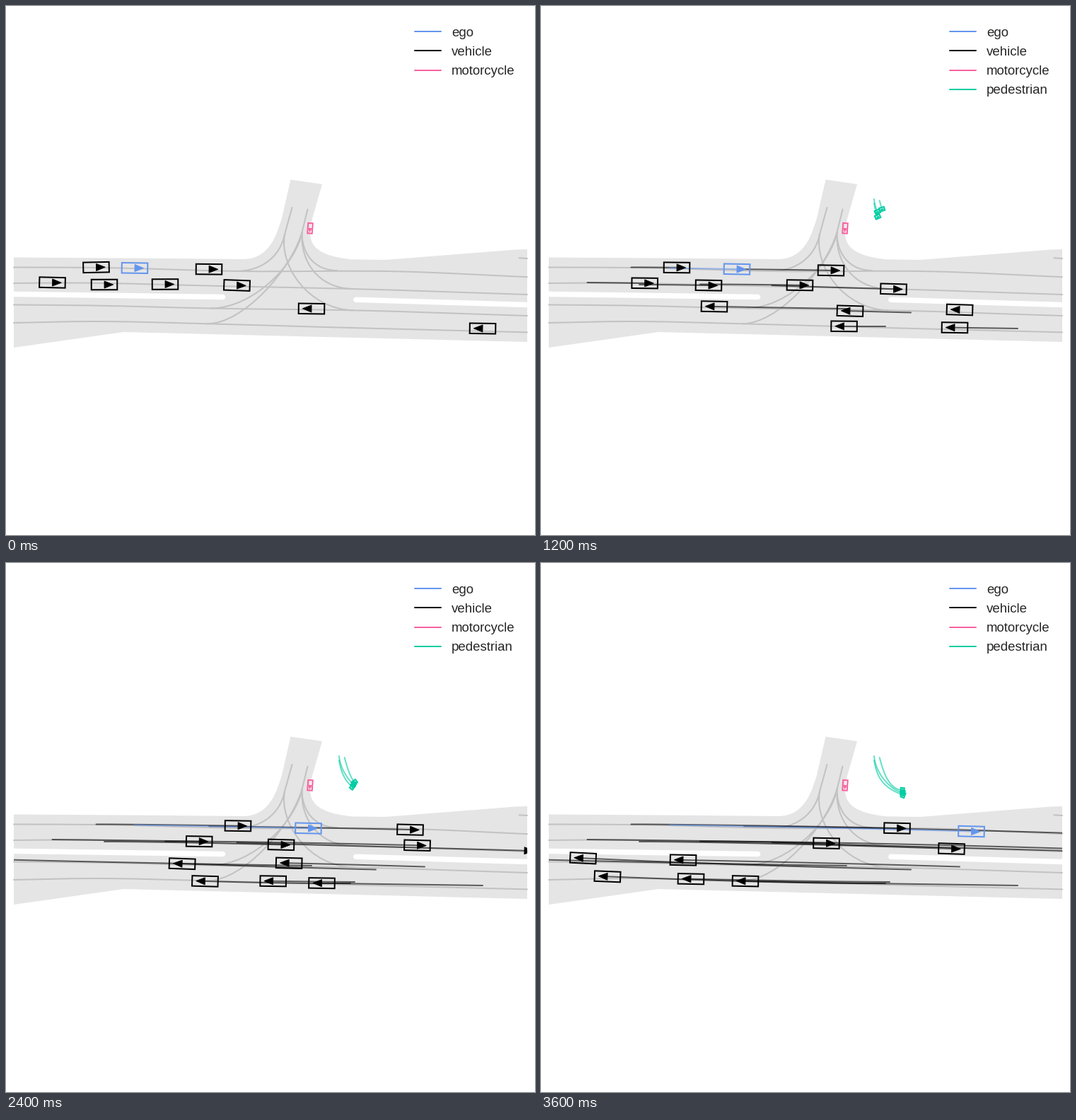
A matplotlib script for the animation above (3800 ms loop, 748 by 748 pixels).

```python
import numpy as np
import matplotlib.pyplot as plt
from matplotlib.animation import FuncAnimation
from matplotlib.patches import PathPatch, Polygon, Rectangle
from matplotlib.path import Path

SIZE, DPI = 748, 64
FRAMES, STEP = 19, 200
LAST = FRAMES - 1
LEFT, RIGHT = 11, 737
PT = 72 / DPI  # points per pixel

ROAD, LANE = "#e5e5e5", "#c2c2c2"
STYLE = {  # colour, body length, body width
    "ego": ("#6495ed", 36.5, 14.5),
    "vehicle": ("#000000", 36.5, 14.5),
    "motorcycle": ("#f9629f", 14.5, 6.5),
    "pedestrian": ("#00cca3", 5, 7),
}

fig = plt.figure(figsize=(SIZE / DPI, SIZE / DPI), dpi=DPI, facecolor="white")
ax = fig.add_axes([0, 0, 1, 1])
ax.set(xlim=(0, SIZE), ylim=(SIZE, 0))
ax.axis("off")
window = Rectangle((LEFT, 0), RIGHT - LEFT, SIZE, transform=ax.transData)


def through(values):
    """Polynomial on 0..1 that passes evenly spaced values."""
    n = len(values)
    return np.poly1d(np.polyfit(np.linspace(0, 1, n), values, n - 1))


def place(points, center, angle):
    c, s = np.cos(angle), np.sin(angle)
    return np.array(points) @ np.array([[c, s], [-s, c]]) + center


def stroke(x, y, color, width=2, **kw):
    line, = ax.plot(x, y, color=color, lw=width * PT, solid_capstyle="round", **kw)
    line.set_clip_path(window)
    return line


def curve(*points):
    codes = [Path.MOVETO] + [Path.CURVE4] * 3
    ax.add_patch(PathPatch(Path(points, codes), fill=False, ec=LANE, lw=2 * PT,
                           capstyle="round", zorder=2))


def lane(*points):
    """Smooth line through a few points ordered by x."""
    x, y = np.array(points, float).T
    slope = np.gradient(y, x)
    for i in range(len(x) - 1):
        h = (x[i + 1] - x[i]) / 3
        curve((x[i], y[i]), (x[i] + h, y[i] + h * slope[i]),
              (x[i + 1] - h, y[i + 1] - h * slope[i + 1]), (x[i + 1], y[i + 1]))


def draw_map():
    road = [(11, 355.5), (210, 356.8), (335, 358),
            (375, 358), (384, 318), (390, 300),
            (402.5, 245.5), (447, 252), (433, 301),
            (425, 332), (430, 352), (488, 358.3),
            (536, 359), (721, 344.5), (737, 344), (737, 475), (166, 461), (11, 483)]
    line, bend = [Path.LINETO], [Path.CURVE4] * 3
    codes = [Path.MOVETO] + line * 2 + bend + line * 3 + bend + line * 6
    ax.add_patch(PathPatch(Path(road, codes), fc=ROAD, lw=0, zorder=0))
    stroke([LEFT, 306.5], [407.4, 411.5], "white", 7.5, zorder=1)
    stroke([494.8, RIGHT], [415.3, 422.5], "white", 7.5, zorder=1)

    lane((LEFT, 369.5), (130, 370), (330, 375), (560, 375.5), (RIGHT, 383.2))
    lane((LEFT, 392), (80, 391.5), (326, 396.5), (490, 400), (RIGHT, 408))
    lane((LEFT, 422.5), (120, 423.5), (290, 427.5), (490, 430.3), (RIGHT, 438))
    lane((LEFT, 448), (120, 446), (285, 449.3), (450, 454), (RIGHT, 461.4))
    lane((725.5, 356.3), (RIGHT, 357))

    exit_, entry = (394, 323), (418.5, 320)
    for end, top in ((exit_, (404.5, 285)), (entry, (426.5, 287.5))):
        stroke(*zip(end, top), LANE, zorder=2)
    curve(exit_, (388, 353), (363, 375), (325, 375))
    curve(exit_, (386, 368), (428, 428), (490, 430.3))
    curve(entry, (418, 350), (436, 374), (468, 374))
    curve(entry, (416, 362), (442, 399), (490, 400))
    curve(entry, (410, 365), (350, 427), (290, 427.5))
    curve(entry, (402, 375), (335, 449), (285, 449.3))


class Agent:
    """Appears at a step, then follows x and y polynomials until the last step."""

    def __init__(self, kind, start, xs, ys):
        color, length, width = STYLE[kind]
        self.start, self.x, self.y = start, through(xs), through(ys)
        a, b = length / 2, width / 2
        self.box = [(-a, -b), (a, -b), (a, b), (-a, b)]
        self.head = [(0, -0.7 * b), (0.7 * a, 0), (0, 0.7 * b)]
        self.trail = stroke([], [], color, alpha=0.6, zorder=3)
        self.outline = Polygon(self.box, fill=False, ec=color, lw=2 * PT, zorder=5)
        self.arrow = Polygon(self.head, fc=color, ec=color, lw=0.8 * PT, zorder=5)
        for patch in (self.outline, self.arrow):
            ax.add_patch(patch)
            patch.set_clip_path(window)

    def heading(self, u):
        dx, dy = self.x.deriv()(u), self.y.deriv()(u)
        return np.arctan2(dy, dx) if dx or dy else np.radians(94)

    def update(self, t):
        shown = t >= self.start
        for artist in (self.trail, self.outline, self.arrow):
            artist.set_visible(shown)
        if not shown:
            return
        u = (t - self.start) / (LAST - self.start)
        past = np.linspace(0, u, 60)
        moving = self.x.order > 0
        self.trail.set_data(self.x(past), self.y(past))
        self.trail.set_visible(moving and t > self.start)
        pose = (self.x(u), self.y(u)), self.heading(u)
        box = place(self.box, *pose)
        self.outline.set_xy(box)
        self.arrow.set_xy(place(self.head, *pose))
        self.outline.set_visible(box[:, 0].min() >= LEFT and box[:, 0].max() <= RIGHT)


def draw_legend():
    rows = []
    for i, (name, style) in enumerate(STYLE.items()):
        y = 36.1 + 27.2 * i
        rows.append((
            stroke([578, 615], [y, y], style[0]),
            ax.text(630, y + 6.6, name, color="#262626", family="Liberation Sans",
                    size=18.6 * PT, va="baseline"),
        ))
    return rows


draw_map()
agents = [
    # eastbound
    Agent("vehicle", 0, (127.5, 192, 328, 503.5), (369.5, 370.6, 375)),
    Agent("vehicle", 0, (65.5, 118.5, 209, 305, 403.5), (391, 392.7, 396.3)),
    Agent("vehicle", 0, (139, 237, 389, 580.5), (394, 396.4, 404)),
    Agent("vehicle", 0, (225, 366, 581.5, 845), (393.5, 396.6, 407)),
    Agent("vehicle", 0, (287, 410, 571.5, 747), (372.2, 375.3, 382)),
    Agent("vehicle", 0, (326.5, 498.5, 733, 980), (395, 403.3, 414.5)),
    # westbound
    Agent("vehicle", 0, (432, 245, 4, -240), (428, 422.5, 412)),
    Agent("vehicle", 0, (674, 585, 446.5, 289), (456, 453.8, 449.8)),
    Agent("vehicle", 3, (523, 376, 217, 59.5), (433.5, 426.9, 417.3)),
    Agent("vehicle", 6, (592, 465.5, 334, 201), (429.5, 424.3, 420)),
    Agent("vehicle", 3, (487, 384, 253, 94), (453, 451, 443.3)),
    Agent("vehicle", 7, (493, 409.5, 318.5, 212), (451, 449.6, 446.7)),
    Agent("pedestrian", 2, (471, 478.5, 493.5, 511.5), (273, 296.5, 315, 325)),
    Agent("pedestrian", 3, (478.7, 485, 495, 511), (275, 295.5, 313, 321.5)),
    Agent("pedestrian", 2, (471, 478.5, 492, 512), (279, 303, 318, 328)),
    Agent("motorcycle", 0, (430,), (314.3,)),
    Agent("ego", 0, (182, 277, 427.5, 608.5), (370.5, 373.4, 379.5)),
]
legend = draw_legend()


def update(t):
    for agent in agents:
        agent.update(t)
    for artist in legend[-1]:
        artist.set_visible(t >= 2)
    return []


anim = FuncAnimation(fig, update, frames=FRAMES, interval=STEP,
                     init_func=lambda: update(0), repeat=True, repeat_delay=0, blit=False)
plt.show()
```
